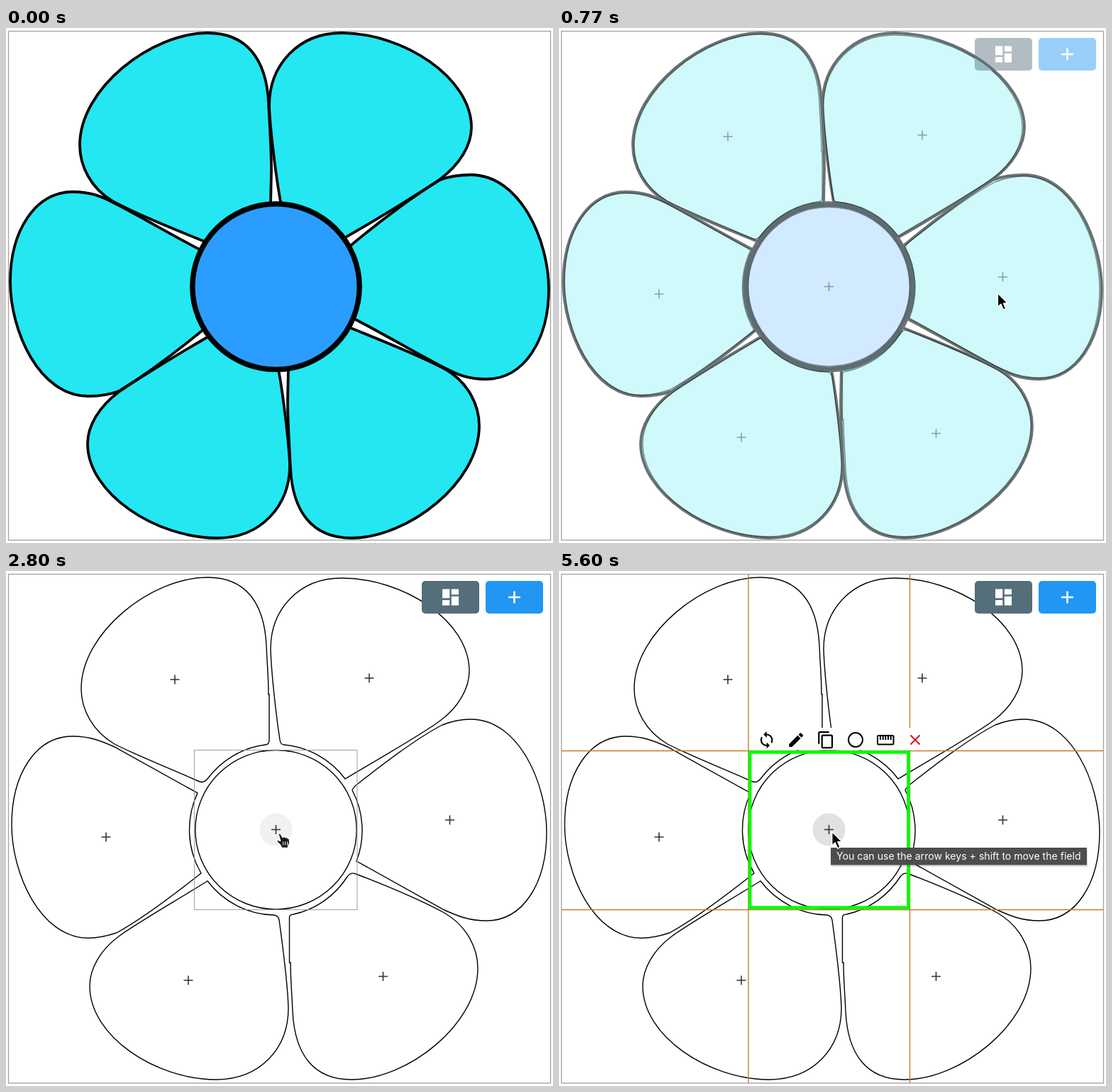
Write an HTML page that moves like this. It is 771 px wide and 726 px high and loops after 5670 ms.

```html
<!DOCTYPE html>
<html lang="en">
<head>
<meta charset="utf-8">
<title>Flower field editor</title>
<style>
  html, body { margin: 0; width: 100%; height: 100%; overflow: hidden; background: #fff; }
  svg { display: block; width: 771px; height: 726px; }
  .line { fill: none; stroke: #000; }
  text { font: 14.1px Inter, Roboto, sans-serif; fill: #fff; }
</style>
</head>
<body>
<svg viewBox="0 0 771 726">
  <defs>
    <g id="petals">
      <path d="M373 250L374 200C374 170 371 125 370 105C367 45 340 7 284 7C205 7 104 85 104 165C104 195 120 226 150 244C175 258 235 283 285 303"/>
      <path d="M388 250C381 215 372 140 371 110C371 52 412 7 473 7C560 7 656 70 656 140C656 165 640 192 612 213C590 228 520 272 475 297"/>
      <path d="M483 309C520 278 570 240 612 214C628 208 640 207 655 207C725 207 765 300 765 368C765 440 730 495 677 495C650 495 635 488 618 479C590 465 530 430 489 409"/>
    </g>
    <g id="flower">
      <use href="#petals"/>
      <use href="#petals" transform="rotate(180 385.5 363)"/>
    </g>
    <clipPath id="aroundCentre">
      <path clip-rule="evenodd" d="M0 0H771V726H0ZM263.5 364.7a117 117 0 0 0 234 0a117 117 0 0 0 -234 0Z"/>
    </clipPath>
    <path id="plus" d="M-6.5 0H6.5M0-6.5V6.5"/>
  </defs>

  <rect class="line" x="3.5" y="4.5" width="764" height="717.5" style="stroke:#a0a0a0" stroke-width="1.3"/>

  <g id="fills">
    <use href="#flower" fill="#24e7f1"/>
    <circle cx="380.5" cy="364.7" r="117" fill="#2b9dff"/>
  </g>
  <g id="outlines" class="line">
    <g clip-path="url(#aroundCentre)"><use href="#flower" stroke-width="3.8"/></g>
    <ellipse cx="380.5" cy="364.7" rx="117.7" ry="116.7" stroke-width="7.4"/>
  </g>

  <g id="editor">
    <g class="line" stroke-width="1.4">
      <path d="M370 174h1V238Q371 245 365 245A121 121 0 0 0 284 293Q279 299 273 297C230 278 180 258 153 244C122 226 106 195 106 166C106 87 205 9 284 9C338 9 364 45 367 105C368 130 370 150 370 174Z"/>
      <path d="M373 110C374 145 381 205 386 238Q387 245 392 245A121 121 0 0 1 478 293C520 268 590 228 612 211C638 192 653 165 653 141C653 70 560 10 473 10C413 10 373 54 373 110Z"/>
      <path d="M488 309Q490 304 496 300C530 273 580 235 615 217C630 211 642 209 655 209C723 209 762 300 762 368C762 440 729 493 677 493C652 493 636 486 618 478L494 409A121 121 0 0 0 488 309Z"/>
      <path d="M401 552h-1.500V490Q399 484 405 484A121 121 0 0 0 481 431Q486 424 493 427C545 447 592 468 618 482C649 500 665 531 665 560C665 639 566 717 487 717C433 717 407 681 404 621C403 596 401 576 401 552Z"/>
      <path d="M398 616C397 581 389 521 385 492Q384 486 378 485A121 121 0 0 1 284 437C251 458 181 498 159 515C133 534 118 561 118 585C118 656 211 717 297 717C359 716 398 673 398 616Z"/>
      <path d="M270 313A122 122 0 0 0 275 426C241 453 191 491 156 510C141 515 129 517.500 116 517.500C48 517 8 426 8 358C8 286 42 233 94 233C119 233 135 240 153 248Z"/>
      <ellipse cx="380.5" cy="364.7" rx="113.7" ry="112.2"/>
    </g>
    <rect x="586" y="14" width="81" height="46" rx="5" fill="#546e7a"/>
    <rect x="676" y="14" width="81" height="46" rx="5" fill="#2196f3"/>
    <path transform="translate(611.2 21.700) scale(1.28)" fill="#fff" d="M3 13h8V3H3zM3 21h8v-6H3zM13 21h8V11h-8zM13 3v6h8V3z"/>
    <path d="M708 37H725M716.5 28.500V45.500" stroke="#fff" stroke-width="2.6"/>
  </g>

  <circle id="handle" cx="380.5" cy="364.5" r="23"/>
  <g id="crosses" stroke="#333" stroke-width="1.6"></g>
  <rect id="hover" class="line" x="265.5" y="252.5" width="229.5" height="225" style="stroke:#999" stroke-width="1.1"/>

  <g id="selection">
    <path d="M267 5V722M494.500 5V722M4 253.500H767M4 477.500H767" stroke="#c77a30" stroke-width="1.4"/>
    <rect x="272" y="221" width="251" height="31.5" fill="#fff"/>
    <rect class="line" x="269.2" y="255.5" width="223.3" height="219" style="stroke:#0f0" stroke-width="4.500"/>
    <g id="icons">
      <path transform="translate(279.5 225) scale(1.1)" d="M12 4V1L8 5l4 4V6c3.31 0 6 2.69 6 6 0 1.01-.25 1.97-.7 2.8l1.46 1.46C19.54 15.03 20 13.57 20 12c0-4.42-3.58-8-8-8zm0 14c-3.31 0-6-2.69-6-6 0-1.01.25-1.97.7-2.8L5.24 7.74C4.46 8.97 4 10.43 4 12c0 4.42 3.58 8 8 8v3l4-4-4-4v3z"/>
      <path transform="translate(321 225) scale(1.1)" d="M3 17.25V21h3.75L17.81 9.94l-3.75-3.75L3 17.25zM20.71 7.04c.39-.39.39-1.02 0-1.41l-2.34-2.34c-.39-.39-1.02-.39-1.41 0l-1.83 1.83 3.75 3.75 1.83-1.83z"/>
      <path transform="translate(363 225) scale(1.1)" d="M16 1H4c-1.100 0-2 .9-2 2v14h2V3h12V1zm3 4H8c-1.100 0-2 .9-2 2v14c0 1.100.9 2 2 2h11c1.100 0 2-.9 2-2V7c0-1.100-.9-2-2-2zm0 16H8V7h11v14z"/>
      <g class="line" stroke-width="2">
        <circle cx="418" cy="238" r="10"/>
        <rect x="449" y="232" width="22.5" height="12.5" rx="1.5"/>
        <path d="M453 232v6M456.700 232v6M460.300 232v6M464 232v6M467.700 232v6"/>
        <path d="M495.500 231.500l13 13m0-13l-13 13" style="stroke:#d8141c"/>
      </g>
    </g>
  </g>

  <g id="tooltip">
    <rect x="384" y="392" width="361" height="25" fill="#000" opacity=".12"/>
    <rect x="383" y="390" width="361" height="24.500" fill="#4d4d4d"/>
    <text x="391" y="407">You can use the arrow keys + shift to move the field</text>
  </g>

  <g id="cursor" stroke="#fff" stroke-width="1.5" stroke-linejoin="round">
    <path id="arrow" d="M0 0V19.500L4.500 15.500L8 23.500L11.500 22L8.200 14.300H14.300Z"/>
    <g id="hand">
      <path d="M-1 3Q1 1 3 4L5 8Q7 6 9 8Q11 7 12 9Q15 9 15 13V17L13 20V23H4L2 19L-3 14Q-3 11 0 12L2 13Z"/>
      <path d="M6 14v5M9 14v5M12 14v5" stroke-width="1"/>
    </g>
  </g>
</svg>
<script>
const FRAME = 70, LOOP = 5670;
const el = id => document.getElementById(id);
const clamp = x => Math.max(0, Math.min(1, x));
const show = (id, alpha) => el(id).setAttribute('opacity', alpha);

const centres = [[238, 153], [512, 151], [141, 375], [380.5, 364.5], [625.5, 351], [257, 577], [531.5, 571.5]];
el('crosses').innerHTML = centres.map(([x, y]) => `<use href="#plus" x="${x}" y="${y}"/>`).join('');

// Cross-dissolve whose first visible step falls on `start`.
const fade = (t, start, steps) => clamp((t - start + FRAME) / (steps * FRAME)) ** 1.35;

function cursorAt(t) {
  if (t <= 1050) return [496 + (1050 - t) * 0.437, 385 - (1050 - t) * 0.04];
  const left = (1 - clamp((t - 1050) / 630)) ** 2;
  return [384.7 + 111.3 * left, 367.5 + 17.5 * left];
}

function draw(t) {
  const edit = fade(t, 490, 9);
  const hover = fade(t, 1750, 4);
  const press = fade(t, 2730, 9);
  const pointing = t >= 1750 ? 1 - press : 0;
  const shade = 255 - 12 * hover - 18 * press;

  show('fills', (1 - edit) ** 2.6);
  show('outlines', 1 - edit);
  show('editor', edit);
  show('crosses', edit);
  show('handle', hover);
  el('handle').setAttribute('fill', `rgb(${shade},${shade},${shade})`);
  show('hover', hover * (1 - press));
  show('selection', fade(t, 3360, 9));
  show('tooltip', fade(t, 4900, 5));

  show('cursor', t >= 490 ? 1 : 0);
  show('hand', pointing);
  show('arrow', 1 - pointing);
  el('cursor').setAttribute('transform', `translate(${cursorAt(t)})`);
}

const origin = performance.now();
function tick() {
  const elapsed = Math.max(0, performance.now() - origin) % LOOP;
  draw(Math.floor(elapsed / FRAME) * FRAME);
  requestAnimationFrame(tick);
}
tick();
</script>
</body>
</html>
```
